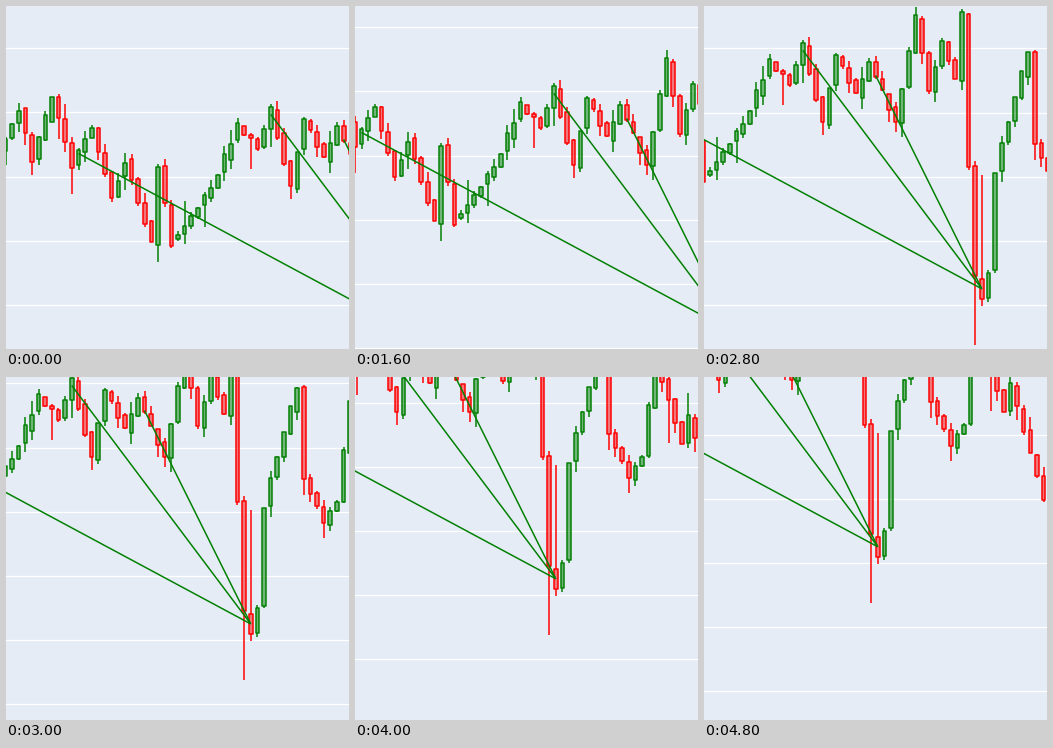
Animation of 343 by 343 pixels, one loop 5000 ms. Source, as a matplotlib script:

```python
import numpy as np
import matplotlib.pyplot as plt
from matplotlib.animation import FuncAnimation
from matplotlib.collections import LineCollection, PolyCollection

SIZE, DPI = 343, 100
FRAMES, INTERVAL = 25, 200
CANDLES, PITCH, FIRST_X, HALF_BODY = 93, 6.63, -0.4, 1.8
LINE = 1.5 * 72 / DPI
UP, DOWN = "#008000", "#ff0000"

# Turning points of the price: (candle, level in pixels measured downwards).
TURNS = [(0, 145), (3, 104), (5, 155), (8, 92), (11, 158), (14, 122),
         (17, 192), (19, 156), (23, 238), (24, 160), (26, 238), (32, 184),
         (36, 120), (39, 141), (41, 104), (44, 180), (46, 113), (49, 152),
         (51, 122), (55, 180), (58, 74), (60, 150), (62, 100), (64, 140),
         (65, 72), (66, 222), (67, 335), (68, 359), (69, 330), (70, 228),
         (75, 109), (76, 202), (79, 245), (81, 225), (83, 126), (87, 212),
         (88, 184), (93, 300)]
CRASH = 66

RAY_END = (443.8, 346.8)
RAY_STARTS = [(72.5, 147.5), (264.8, 108.4), (337.6, 133.4)]

# Drags of the view: (first frame, dx, dy).
DRAGS = [(5, 66, 21), (9, 81, 29), (12, 19, 14),
         (15, 47, 51), (18, 30, 30), (21, 27, 32)]
DRAG_FRAMES = 3


def make_candles():
    rng = np.random.default_rng(7)
    path = np.interp(np.arange(CANDLES + 1), *zip(*TURNS))
    opens = path[:-1] + rng.normal(0, 2, CANDLES)
    closes = path[1:] + rng.normal(0, 2, CANDLES)
    top, bottom = np.minimum(opens, closes), np.maximum(opens, closes)
    high = top - rng.exponential(5, CANDLES)
    low = bottom + rng.exponential(6, CANDLES)
    # The crash spikes far down, and the next candle opens with a long wick.
    low[CRASH], high[CRASH + 1] = 403, 233
    return closes < opens, top, bottom, high, low


def draw_candles(chosen, top, bottom, high, low, color):
    bodies, wicks = [], []
    for i in np.flatnonzero(chosen):
        x = FIRST_X + PITCH * i
        left, right = x - HALF_BODY, x + HALF_BODY
        bodies.append([(left, top[i]), (right, top[i]),
                       (right, bottom[i]), (left, bottom[i])])
        wicks += [[(x, high[i]), (x, top[i])], [(x, bottom[i]), (x, low[i])]]
    ax.add_collection(LineCollection(wicks, colors=color, linewidths=LINE, zorder=2))
    ax.add_collection(PolyCollection(bodies, facecolors=[(color, 0.5)],
                                     edgecolors=color, linewidths=LINE, zorder=2))


def scroll(frame):
    dx = dy = 0
    for start, move_x, move_y in DRAGS:
        t = np.clip((frame - start + 1) / DRAG_FRAMES, 0, 1)
        eased = 1 - (1 - t) ** 3
        dx += move_x * eased
        dy += move_y * eased
    return dx, dy


fig = plt.figure(figsize=(SIZE / DPI, SIZE / DPI), dpi=DPI, facecolor="#e5ecf6")
ax = fig.add_axes([0, 0, 1, 1])
ax.axis("off")

for k in range(8):
    ax.axhline(42.2 + 64.15 * k, color="white", lw=0.9, zorder=1)

rising, *levels = make_candles()
draw_candles(rising, *levels, UP)
draw_candles(~rising, *levels, DOWN)
ax.add_collection(LineCollection([[start, RAY_END] for start in RAY_STARTS],
                                 colors=UP, linewidths=LINE, zorder=3))


def update(frame):
    dx, dy = scroll(frame)
    ax.set_xlim(dx, dx + SIZE)
    ax.set_ylim(dy + SIZE, dy)
    return []


anim = FuncAnimation(fig, update, frames=FRAMES, interval=INTERVAL,
                     repeat=True, repeat_delay=0)
plt.show()
```
